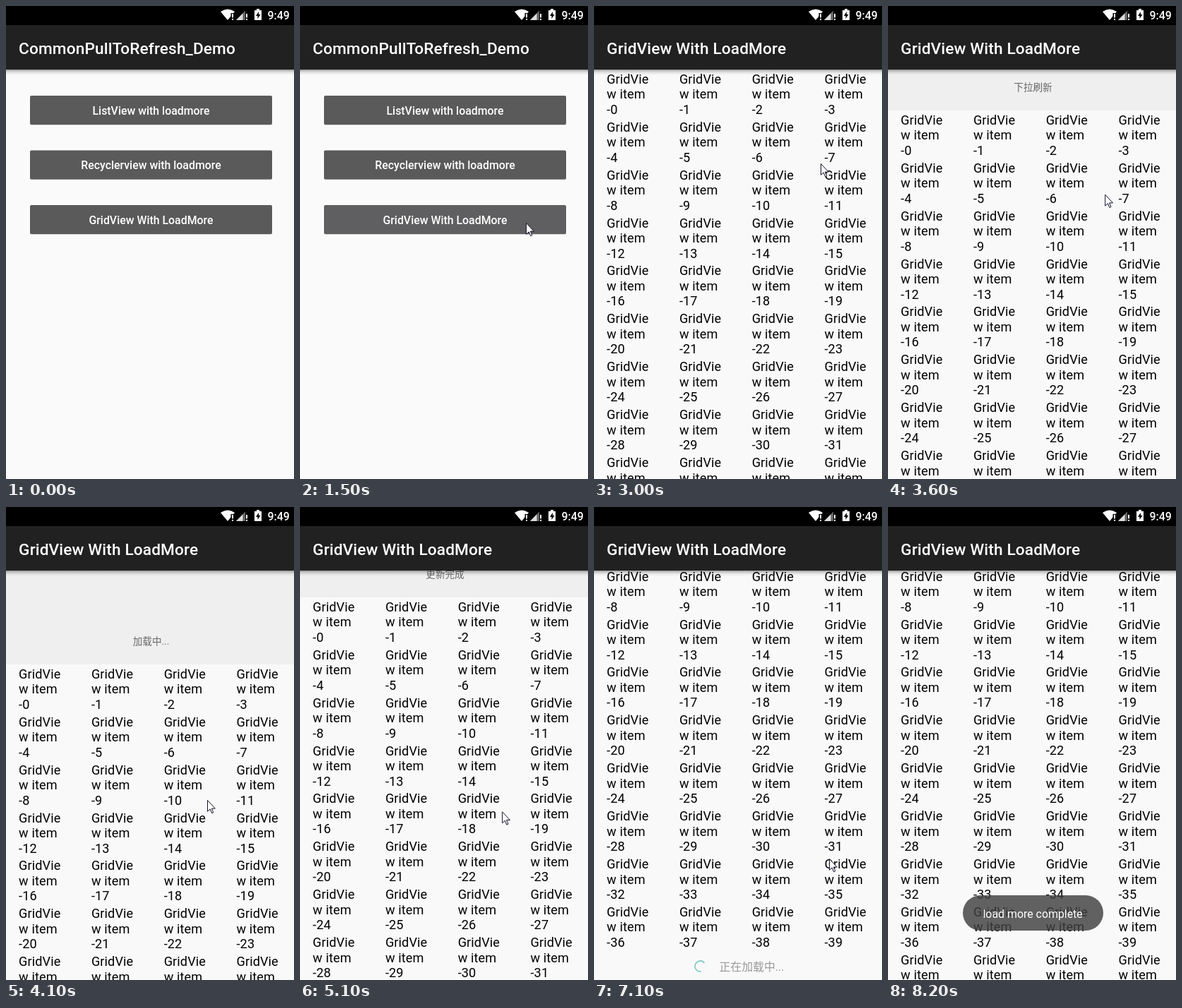
Animation of 408x670 px, one loop 8900 ms. Source, as an HTML page:

```html
<!DOCTYPE html>
<html lang="en">
<head>
<meta charset="utf-8">
<title>Pull to refresh demo</title>
<style>
  html, body { margin: 0; width: 100%; height: 100%; overflow: hidden; background: #fafafa; }
  svg { display: block; width: 408px; height: 670px; }
  text { font: 18.13px Roboto, "Noto Sans CJK SC", "Noto Sans CJK", sans-serif; white-space: pre; }
  #items text { letter-spacing: .1px; }
  .title { font-size: 22.67px; font-weight: 500; fill: #fff; letter-spacing: .12px; }
  .button text, .clock { font-size: 15.87px; font-weight: 500; fill: #fff; }
  .button text, .label { text-anchor: middle; }
  .label { font-size: 13.6px; fill: #666; }
  .more { font-size: 15.87px; fill: #999; }
  .toast text { font-size: 15.9px; fill: #fff; }
  .spin { fill: none; stroke: #80cbc4; stroke-width: 1.7; }
</style>
</head>
<body>
<svg viewBox="0 0 408 670">
  <defs>
    <linearGradient id="shade" x2="0" y2="1">
      <stop offset="0" stop-opacity=".42"/>
      <stop offset=".25" stop-opacity=".2"/>
      <stop offset=".6" stop-opacity=".07"/>
      <stop offset="1" stop-opacity="0"/>
    </linearGradient>
    <g id="bar">
      <rect y="27" width="408" height="63" fill="#212121"/>
      <rect y="90" width="408" height="8" fill="url(#shade)"/>
    </g>
  </defs>

  <g id="menu">
    <rect width="408" height="670" fill="#fafafa"/>
    <use href="#bar"/>
    <text class="title" x="18.1" y="68">CommonPullToRefresh_Demo</text>
  </g>

  <g id="page">
    <rect width="408" height="670" fill="#efefef"/>
    <g id="header">
      <text class="label" id="label" x="205.5" y="61.5"></text>
      <circle class="spin" id="headSpin" cx="148" cy="56.5" r="7.5" pathLength="360"/>
    </g>
    <g id="list">
      <rect y="90" width="408" height="900" fill="#f9f9f9"/>
      <g id="items"></g>
      <g id="footer">
        <circle class="spin" id="footSpin" cx="150.5" cy="791.5" r="7.5" pathLength="360"/>
        <text class="more" x="177.5" y="797.5">正在加载中...</text>
      </g>
    </g>
    <use href="#bar"/>
    <text class="title" x="18.1" y="68">GridView With LoadMore</text>
    <g class="toast" id="toast">
      <rect x="106" y="550" width="199" height="50" rx="25" fill="#404040" fill-opacity=".82"/>
      <text x="134.5" y="581.8">load more complete</text>
    </g>
  </g>

  <g id="status">
    <rect width="408" height="27" fill="#000"/>
    <path d="M304 8Q314 1 324 8L314 20Z" fill="#fff"/>
    <path d="M318.5 10H325V21H318.5Z" fill="#000"/>
    <path d="M320 11h2v5.500h-2zM320 18h2v2h-2zM340 11h2v5.500h-2zM340 18h2v2h-2z" fill="#fff"/>
    <path d="M326 20L339 6.500V20Z" fill="#666"/>
    <path d="M326 20L335.500 10.500V20Z" fill="#ddd"/>
    <path d="M352 6h3V4h4v2h3v14h-10z" fill="#fff"/>
    <path d="M358 8l-4 6h2.500v4l4-6h-2.500z" fill="#000"/>
    <text class="clock" x="370.5" y="18.8">9:49</text>
  </g>

  <path id="cursor" d="M.5 .5V16.300L4.200 12.900L6.600 18.700L8.800 17.800L6.400 12.100H11.300Z"
        fill="#fff" stroke="#10102a" stroke-width="1"/>
</svg>
<script>
const LOOP = 8900, STEP = 100, ROW = 67.9, LINE = 21.5, HEAD = 66;
const $ = id => document.getElementById(id);

function add(parent, tag, attrs, content = '') {
  const el = document.createElementNS('http://www.w3.org/2000/svg', tag);
  for (const key in attrs) el.setAttribute(key, attrs[key]);
  el.textContent = content;
  parent.append(el);
  return el;
}

const buttons = ['ListView with loadmore', 'Recyclerview with loadmore', 'GridView With LoadMore']
  .map((name, i) => {
    const y = 127 + i * 77.5;
    const g = add($('menu'), 'g', { class: 'button' });
    add(g, 'rect', { x: 34, y: y + .7, width: 343, height: 41, rx: 2, fill: '#000', opacity: .2 });
    const face = add(g, 'rect', { x: 34, y, width: 343, height: 41, rx: 2, fill: '#5a5a5a' });
    add(g, 'text', { x: 205.5, y: y + 26.8 }, name);
    return face;
  });

const rows = Array.from({ length: 11 }, (_, r) => {
  const g = add($('items'), 'g', {});
  for (let c = 0; c < 4; c++) {
    ['GridVie', 'w item', '-' + (r * 4 + c)].forEach((word, k) =>
      add(g, 'text', { x: 18.1 + c * 102.8, y: 109.8 + r * ROW + k * LINE }, word));
  }
  return g;
});

// Each point is [time, ...values]; values run straight between points.
const pointer = [
  [300, 358, 271], [700, 320, 307], [2500, 320, 307], [3000, 321, 223],
  [3200, 321, 168], [3300, 322, 168], [3400, 322, 168], [3900, 285, 415],
  [5000, 285, 415], [5600, 292, 513], [5800, 300, 560], [5900, 300, 560],
  [6100, 325, 606], [6800, 334, 465], [7100, 333, 498], [7700, 327, 526],
  [7900, 327, 526], [8100, 361, 392]
];
const close = from => [[from, 66], [from + 100, 60], [from + 200, 38],
  [from + 300, 14], [from + 400, 3], [from + 500, 0]];
const pull = [
  [1700, 0], [1900, HEAD], ...close(2500), [3400, 0], [3900, 145],
  [4000, 145], [4100, 133], [4200, 85], [4300, HEAD], ...close(4900)
];
const scroll = [[6100, 0], [6800, 141]];
const fade = [[1500, 0], [1600, .45], [1700, .9], [1800, 1]];
const toastFade = [[7600, 0], [7800, 1]];

function at(points, t) {
  const i = points.findIndex(p => p[0] > t);
  if (i === 0) return points[0].slice(1);
  if (i < 0) return points[points.length - 1].slice(1);
  const [a, b] = [points[i - 1], points[i]];
  const k = (t - a[0]) / (b[0] - a[0]);
  return a.slice(1).map((v, n) => v + (b[n + 1] - v) * k);
}

const show = (el, on) => { el.style.display = on ? '' : 'none'; };
const move = (el, x, y) => el.setAttribute('transform', `translate(${x} ${y})`);
const ease = k => { k = Math.min(1, Math.max(0, k)); return k * k * (3 - 2 * k); };

function spin(el, ms) {
  const k = ms % 700 / 700;
  const tail = 270 * ease(k * 2 - 1);
  const sweep = 270 * ease(k * 2) - tail;
  const turn = 218 + ms * .4 + tail - 90;
  el.setAttribute('stroke-dasharray', `${sweep} ${360 - sweep}`);
  el.setAttribute('transform', `rotate(${turn} ${el.getAttribute('cx')} ${el.getAttribute('cy')})`);
}

function caption(t, offset) {
  if (t < 2500 || (t >= 4100 && t < 4900)) return '加载中...';
  if (t >= 3500 && t < 4100) return offset > HEAD * 1.2 ? '释放刷新' : '下拉刷新';
  return '更新完成';
}

function render(t) {
  buttons[2].setAttribute('fill', t < 1200 ? '#5a5a5a' : t < 1300 ? '#5c5c5d' : '#5f5f61');

  const [alpha] = at(fade, t);
  $('page').style.opacity = alpha;
  show($('page'), alpha > 0);

  const [offset] = at(pull, t);
  move($('header'), 0, offset);
  move($('list'), 0, offset - at(scroll, t)[0]);
  $('label').textContent = caption(t, offset);

  const begin = t < 4000 ? 1800 : 4100;
  const busy = (t > 1800 && t < 2500) || (t > 4100 && t < 4900);
  show($('headSpin'), busy);
  if (busy) spin($('headSpin'), t - begin);

  const loaded = t >= 7600;
  show($('items'), t >= 2400);
  show(rows[10], loaded);
  show($('footer'), t >= 2400 && !loaded);
  if (t > 5420) spin($('footSpin'), t - 5420);

  $('toast').style.opacity = at(toastFade, t)[0];
  show($('cursor'), t >= 300 && t < 8200);
  move($('cursor'), ...at(pointer, t));
}

const start = performance.now();
function frame() {
  const t = Math.max(0, performance.now() - start) % LOOP;
  render(Math.floor(t / STEP) * STEP);
  requestAnimationFrame(frame);
}
frame();
</script>
</body>
</html>
```
